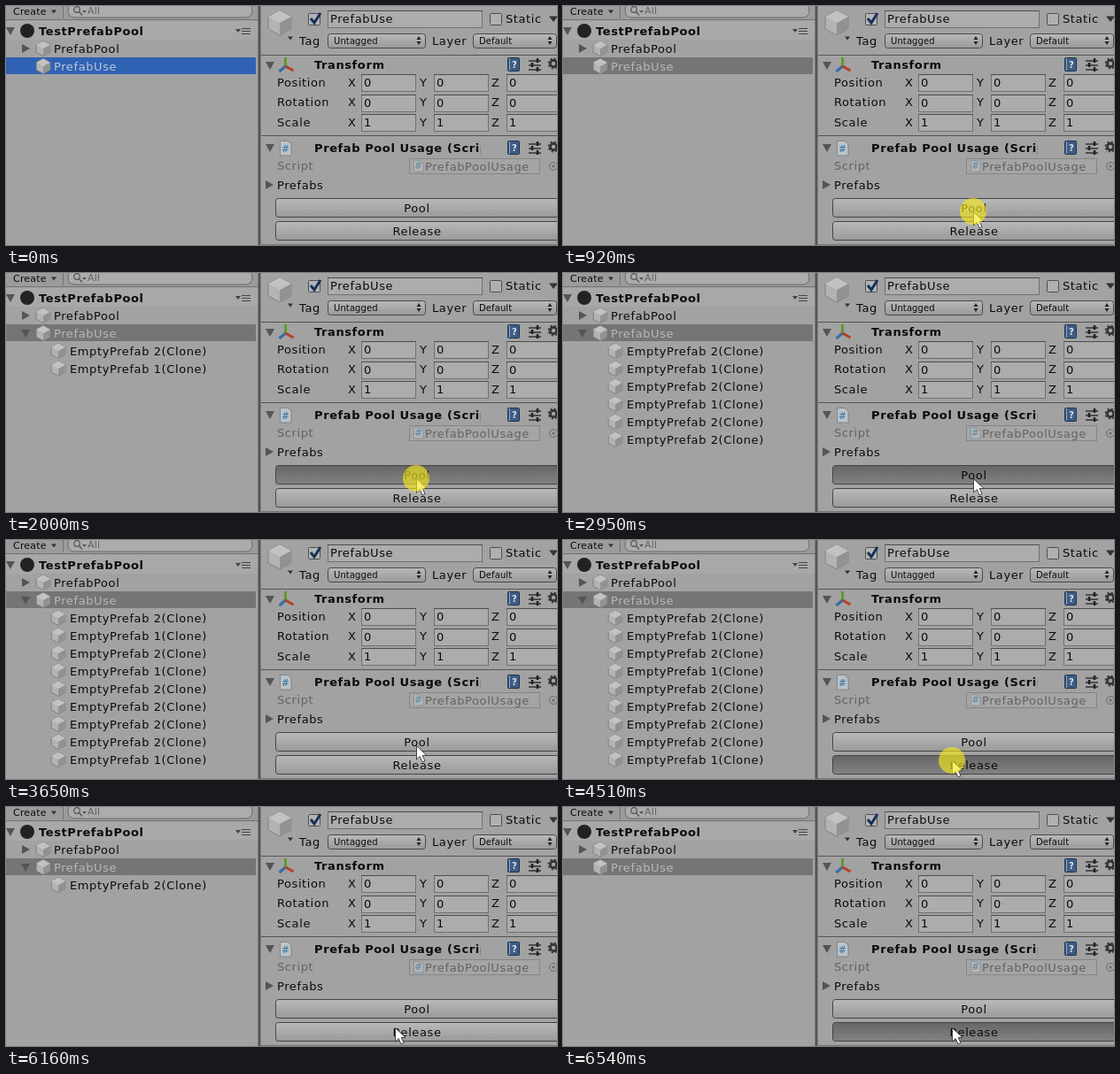
These frames come from a looping animation (622x270 px, 6.62 s). An HTML page:

```html
<!DOCTYPE html>
<html lang="en">
<head>
<meta charset="utf-8">
<title>Prefab pool inspector</title>
<style>
html, body { margin: 0; width: 100%; height: 100%; overflow: hidden; background: #a2a2a2; }
svg { display: block; }
text { font: 13px "DejaVu Sans", sans-serif; letter-spacing: .6px; fill: #0b0b0b; white-space: pre; }
.bold { font-weight: bold; }
.small { font-size: 11px; letter-spacing: .2px; }
.mini { font-size: 10px; letter-spacing: .1px; }
.dim { fill: #626262; }
.mid { text-anchor: middle; }
</style>
</head>
<body>
<svg id="stage" width="622" height="270" viewBox="0 0 622 270">
  <defs>
    <linearGradient id="up" x2="0" y2="1"><stop stop-color="#b9b9b9"/><stop offset="1" stop-color="#999"/></linearGradient>
    <linearGradient id="down" x2="0" y2="1"><stop stop-color="#666"/><stop offset="1" stop-color="#828282"/></linearGradient>
    <clipPath id="titleClip"><rect x="340" y="148" width="196" height="26"/></clipPath>
  </defs>
</svg>
<script>
const LOOP = 6620;
const stage = document.getElementById('stage');

function add(tag, attrs, parent = stage) {
  const node = document.createElementNS(stage.namespaceURI, tag);
  for (const key in attrs) node.setAttribute(key, attrs[key]);
  parent.append(node);
  return node;
}
function label(x, y, words, cls = '', parent = stage) {
  const node = add('text', { x, y, class: cls }, parent);
  node.textContent = words;
  return node;
}
const box = (x, y, width, height, fill, extra = {}, parent = stage) =>
  add('rect', { x, y, width, height, fill, ...extra }, parent);
const path = (d, fill, extra = {}, parent = stage) => add('path', { d, fill, ...extra }, parent);
const stroke = (d, color, width = 1, parent = stage) =>
  path(d, 'none', { stroke: color, 'stroke-width': width }, parent);
const ring = (cx, cy, r, color, width = 1, extra = {}) =>
  add('circle', { cx, cy, r, fill: 'none', stroke: color, 'stroke-width': width, ...extra });
const group = (x = 0, y = 0, parent = stage) => add('g', { transform: `translate(${x} ${y})` }, parent);
const show = (node, on) => node.setAttribute('visibility', on ? 'visible' : 'hidden');

const opened = (x, y, parent) => path(`M${x - 5} ${y - 4}h10l-5 9z`, '#555', {}, parent);
const closed = (x, y, parent) => path(`M${x - 4} ${y - 5}v10l9-5z`, '#555', {}, parent);
const dropMark = (x, y, r = 3) => path(`M${x - r} ${y - r / 2}h${r * 2}l${-r} ${r * 1.3}z`, '#333');

function cube(x, y, r, parent) {
  const g = group(x, y, parent), w = r * .92, h = r / 2;
  path(`M0 ${-r}L${w} ${-h}V${h}L0 ${r}L${-w} ${h}V${-h}z`, '#b3b3b3',
    { stroke: '#787878', 'stroke-width': .8, 'stroke-linejoin': 'round' }, g);
  path(`M0 0L${w} ${-h}V${h}L0 ${r}z`, '#929292', {}, g);
  path(`M0 ${-r}L${w} ${-h}L0 0L${-w} ${-h}z`, '#c2c2c2', {}, g);
}
function field(x, y, w, h, words) {
  box(x + .5, y + .5, w - 1, h - 1, '#acacac', { stroke: '#707070' });
  stroke(`M${x} ${y + .5}h${w}`, '#4d4d4d');
  label(x + 3, Math.floor(y + h / 2 + 4), words);
}
function popup(x, y, w, words) {
  box(x + .5, y + .5, w - 1, 16, 'url(#up)', { rx: 3, stroke: '#4a4a4a' });
  label(x + 7, y + 12, words, 'mini');
  const a = x + w - 8;
  path(`M${a - 2.5} ${y + 7}h5l-2.5-4zM${a - 2.5} ${y + 9}h5l-2.5 4z`, '#222');
}
function scriptIcon(x, y, w, h, opacity = 1) {
  const g = group(x, y);
  g.setAttribute('opacity', opacity);
  path(`M.5 .5H${w - 4}L${w} 4V${h}H.5z`, '#bcc3c8', { stroke: '#737b80', 'stroke-width': .8 }, g);
  label(w / 2, h * .75, '#', 'mini mid bold', g).setAttribute('style', 'fill:#4a7fa8');
}
function headerIcons(y) {
  box(566.5, y - 7.5, 13, 15, '#3c5c84', { rx: 1, stroke: '#22344c' });
  stroke(`M568.5 ${y - 7}v14`, '#8fa3ba');
  label(574, y + 4, '?', 'mini mid bold').setAttribute('style', 'fill:#d6e0ea');
  stroke(`M590 ${y - 4}h14M590 ${y + 1}h14M590 ${y + 6}h14`, '#333', 1.6);
  stroke(`M600 ${y - 7}v5M594 ${y - 2}v5M600 ${y + 3}v5`, '#222', 2.6);
  ring(618, y - 1, 3.6, '#333', 2.6);
  ring(618, y - 1, 5.5, '#333', 1.8, { 'stroke-dasharray': '2.2 2.12' });
}

function drawHierarchy() {
  box(0, 0, 285, 15, '#9b9b9b');
  label(8, 10, 'Create', 'small');
  dropMark(54, 6);
  stroke('M64.5 0V14M0 15.5H285', '#747474');
  path('M78 -3H270Q278 -3 278 5Q278 13 270 13H78Q70 13 70 5Q70 -3 78 -3z', '#acacac', { stroke: '#6b6b6b' });
  stroke('M82.5 6.5l3.5 4', '#555', 1.4);
  ring(80, 4, 3.3, '#555', 1.2);
  path('M86 5h5l-2.5 3z', '#555');
  label(92, 9, 'All', 'small dim');
  box(0, 17, 285, 21, '#a8a8a8');
  opened(5, 28);
  add('circle', { cx: 24, cy: 28, r: 8, fill: '#222' });
  label(37, 33, 'TestPrefabPool', 'bold');
  path('M259 26h6l-3 4z', '#444');
  stroke('M266 25.5h10M266 28.5h10M266 31.5h10', '#444');
  closed(22, 48);
  cube(42, 48, 8.5);
  label(54, 53, 'PrefabPool');
}

function drawInspector() {
  stroke('M286 0V270', '#555', 3);
  cube(309, 19, 14);
  dropMark(321, 36);
  box(341.5, 8.5, 13, 13, '#b4b4b4', { rx: 1, stroke: '#4e4e4e' });
  stroke('M344 14l4 5l7-11', '#17305a', 3);
  field(363, 5, 175, 20, 'PrefabUse');
  box(546.5, 8.5, 13, 13, '#b0b0b0', { rx: 1, stroke: '#4e4e4e' });
  label(564, 19, 'Static');
  dropMark(618, 14, 5);
  label(331, 44, 'Tag');
  popup(363, 31, 111, 'Untagged');
  label(481, 44, 'Layer');
  popup(527, 31, 95, 'Default');
  stroke('M288 55.5H622M288 146.5H622', '#555');

  opened(298, 67);
  stroke('M315.5 68V58', '#5d9b28', 3);
  stroke('M315.5 68l-7 6', '#316eaa', 3);
  stroke('M315.5 68l9 5', '#b83d29', 3);
  label(348, 71, 'Transform', 'bold');
  headerIcons(66);
  [['Position', 0], ['Rotation', 0], ['Scale', 1]].forEach(([name, value], row) => {
    const y = 77 + row * 22.5;
    label(306, Math.floor(y + 14), name);
    ['X', 'Y', 'Z'].forEach((axis, i) => {
      label(386 + i * 81, Math.floor(y + 14), axis);
      field(401 + i * 82, Math.round(y), 62, 20, value);
    });
  });

  opened(298, 160);
  scriptIcon(309, 152, 13, 17);
  label(348, 165, 'Prefab Pool Usage (Script)', 'bold').setAttribute('clip-path', 'url(#titleClip)');
  headerIcons(160);
  label(306, 185, 'Script', 'dim');
  box(455.5, 172.5, 147, 17, '#a5a5a5', { stroke: '#858585' });
  scriptIcon(460, 174, 11, 13, .6);
  label(473, 186, 'PrefabPoolUsage', 'dim');
  ring(618, 181, 4.5, '#6b6b6b');
  add('circle', { cx: 618, cy: 181, r: 1.5, fill: '#6b6b6b' });
  closed(297, 202);
  label(306, 207, 'Prefabs');
  stroke('M288 269.5H622', '#757575');
}

function makeButton(y, words) {
  const face = box(304.5, y + .5, 330, 21, 'url(#up)', { rx: 3, stroke: '#454545' });
  label(464, y + 16, words, 'mid');
  return face;
}
function makeClone(row) {
  const g = group(0, 88 + row * 20);
  cube(59, 0, 8.5, g);
  return { g, text: label(72, 5, '', '', g) };
}

drawHierarchy();
const selection = box(0, 58, 282, 19, '#3062b4');
const foldout = opened(22, 68);
cube(42, 68, 8.5);
const selectedName = label(54, 73, 'PrefabUse');
const clones = Array.from({ length: 9 }, (_, row) => makeClone(row));
drawInspector();
const faces = { pool: makeButton(217, 'Pool'), release: makeButton(243, 'Release') };
const pointer = group();
path('M.5 .5V16L4.2 12.5L7 18.8L10 17.5L7.2 11.5H12z', '#fff', { stroke: '#333', 'stroke-width': .9 }, pointer);
const halo = add('circle', { r: 15, fill: '#f4e61c', 'fill-opacity': .65 }, pointer);

// Each step lists only what changes.
const steps = [
  [0, { focus: true, at: null, halo: false, press: '', list: '' }],
  [300, { at: [488, 261] }],
  [380, { at: [481, 253] }],
  [460, { at: [474, 244] }],
  [540, { at: [467, 236] }],
  [620, { at: [463, 232] }],
  [920, { focus: false, halo: true }],
  [1000, { press: 'pool' }],
  [1150, { list: '2', press: '', halo: false }],
  [1610, { press: 'pool', halo: true }],
  [1760, { list: '21', press: '' }],
  [1840, { halo: false }],
  [1920, { halo: true }],
  [2000, { press: 'pool' }],
  [2230, { list: '212' }],
  [2400, { list: '2121' }],
  [2550, { list: '21212' }],
  [2870, { list: '212122' }],
  [2950, { halo: false }],
  [3020, { list: '2121222' }],
  [3100, { press: '' }],
  [3270, { press: 'pool', halo: true }],
  [3570, { list: '21212222' }],
  [3650, { list: '212122221', press: '', halo: false }],
  [3800, { at: [458, 236] }],
  [3880, { at: [452, 241] }],
  [4030, { at: [447, 244] }],
  [4110, { at: [442, 247] }],
  [4190, { at: [439, 249] }],
  [4510, { press: 'release', halo: true }],
  [4800, { list: '22122221' }],
  [4970, { list: '2212221' }],
  [5120, { list: '212221' }],
  [5290, { list: '21221' }],
  [5440, { list: '2122' }],
  [5590, { list: '212' }],
  [5910, { list: '22' }],
  [6080, { list: '2' }],
  [6160, { press: '', halo: false }],
  [6230, { press: 'release', halo: true }],
  [6310, { list: '', press: '' }],
  [6390, { press: 'release' }],
  [6540, { halo: false }]
];

function render(time) {
  const state = Object.assign({}, ...steps.filter(([start]) => start <= time).map(([, change]) => change));
  selection.setAttribute('fill', state.focus ? '#3062b4' : '#757575');
  selectedName.style.fill = state.focus ? '#bcc8d8' : '#b8b8b8';
  show(foldout, state.list);
  clones.forEach(({ g, text }, row) => {
    const kind = state.list[row];
    show(g, kind);
    text.textContent = kind ? `EmptyPrefab ${kind}(Clone)` : '';
  });
  for (const name in faces) faces[name].setAttribute('fill', `url(#${state.press === name ? 'down' : 'up'})`);
  show(pointer, state.at);
  if (state.at) pointer.setAttribute('transform', `translate(${state.at})`);
  show(halo, state.at && state.halo);
}

const begin = performance.now();
function tick() {
  render((performance.now() - begin) % LOOP);
  requestAnimationFrame(tick);
}
tick();
</script>
</body>
</html>
```
